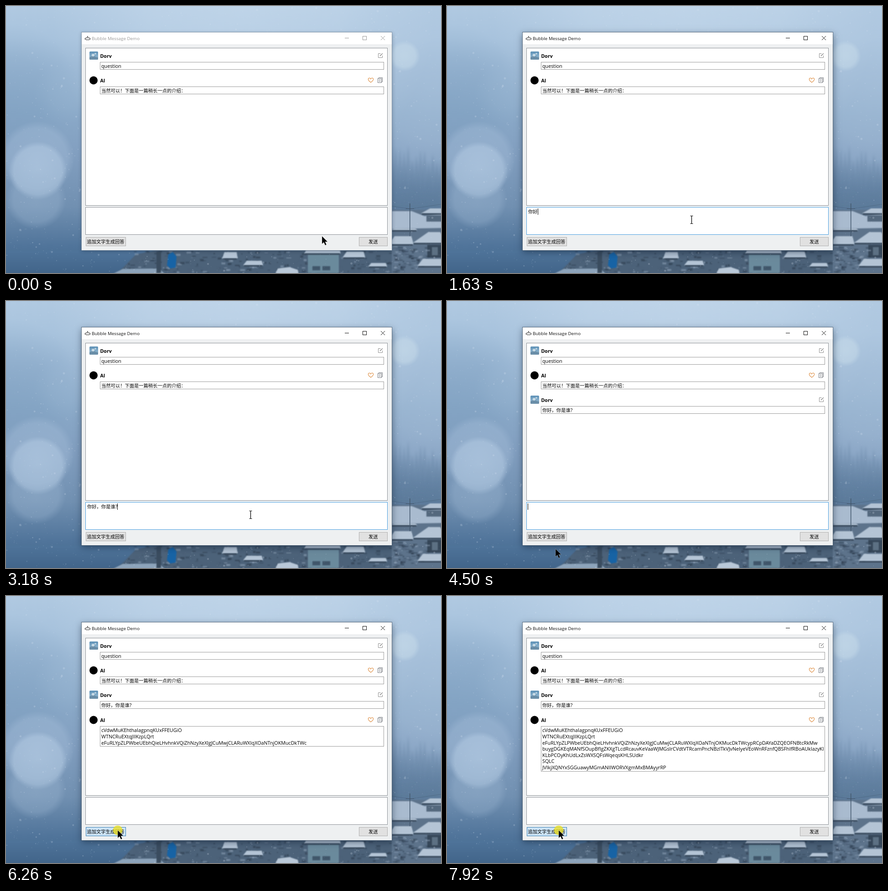
These frames come from a looping animation (954 px wide and 587 px high, 8 s). An HTML page with a canvas:

```html
<!DOCTYPE html>
<html lang="zh-CN">
<head>
<meta charset="utf-8">
<title>Bubble Message Demo</title>
<style>
html, body { margin: 0; width: 100%; height: 100%; overflow: hidden; background: #8aa6c2; }
canvas { display: block; width: 100vw; height: 100vh; }
</style>
</head>
<body>
<canvas id="stage" width="954" height="587"></canvas>
<script>
const W = 954, H = 587, LOOP = 8000;
const stage = document.getElementById('stage').getContext('2d');
let g = stage;

const LATIN = '"Open Sans", sans-serif';
const HAN = '"Noto Sans CJK SC", "Noto Sans CJK", sans-serif';
const USER = 'Dorv';

const ANSWER = [
  'cVdwMuKEhthaIagpnqKUxFFEUGiO',
  'WTNCRuEXtqJIIKzpLQrt',
  'eFuRLYpZLPWbeUEbhQieLHvhnkVQiZhNzyXeXIgJCuMwjCLARuWXIqXOaNTnjOKMucDkTWcypRCpDAYaDZQEOFNBtcRkMw',
  'buygDGKEqMANfSOupBfIgZKXgTLcdRcauvKeVaaWJMGsIrCVdtVTRcamPncNBzITkVJvNeIyeVEoWnRFznfQBSFhIfRBoAUkIazyKl',
  'KLbPCOyKhUdLxZsWXSQFsWqeqsKHLSUdkr',
  'SQLC',
  'JVIkjXQNYxSGGuawyMGmANIIWORVXgmMxBMAyyrRP'
].join('\n');
const MARK_1 = ANSWER.indexOf('WTN') + 3;
const MARK_2 = ANSWER.indexOf('FznfQ');

// ---------- drawing helpers ----------
function rect(x, y, w, h, fill) {
  g.fillStyle = fill;
  g.fillRect(x, y, w, h);
}

function frame(x, y, w, h, line, fill) {
  if (fill) rect(x, y, w, h, fill);
  g.strokeStyle = line;
  g.lineWidth = 1;
  g.strokeRect(x, y, w, h);
}

function poly(pts, fill, line, width = 1, open) {
  g.beginPath();
  for (let i = 0; i < pts.length; i += 2) g.lineTo(pts[i], pts[i + 1]);
  if (!open) g.closePath();
  if (fill) { g.fillStyle = fill; g.fill(); }
  if (line) { g.strokeStyle = line; g.lineWidth = width; g.stroke(); }
}

function disc(x, y, r, fill) {
  g.fillStyle = fill;
  g.beginPath();
  g.arc(x, y, r, 0, 7);
  g.fill();
}

// Soft light; edge sets how far the flat middle reaches.
function glow(x, y, r, color, alpha, edge = 0.5) {
  const grad = g.createRadialGradient(x, y, 0, x, y, r);
  grad.addColorStop(0, `rgba(${color},${alpha})`);
  grad.addColorStop(edge, `rgba(${color},${alpha * 0.8})`);
  grad.addColorStop(1, `rgba(${color},0)`);
  rect(x - r, y - r, 2 * r, 2 * r, grad);
}

function vertical(y0, y1, stops) {
  const grad = g.createLinearGradient(0, y0, 0, y1);
  stops.forEach(([p, c]) => grad.addColorStop(p, c));
  return grad;
}

// Draws mixed Latin and Chinese text, returns the end position.
function text(s, x, y, { size = 10.75, han = size * 0.958, color = '#000', weight = '' } = {}) {
  g.fillStyle = color;
  for (const run of s.match(/[\x00-\xff]+|[^\x00-\xff]+/g) || []) {
    g.font = run.charCodeAt(0) > 255 ? `${weight} ${han}px ${HAN}` : `${weight} ${size}px ${LATIN}`;
    g.fillText(run, x, y);
    x += g.measureText(run).width;
  }
  return x;
}

function seeded(seed) {
  return () => (seed = (seed * 16807) % 2147483647) / 2147483647;
}

// ---------- wallpaper ----------
function roof(x, y, w, h, slant) {
  poly([x + slant, y, x + w - slant * 0.4, y, x + w, y + h, x, y + h], '#b4c4d5');
  rect(x + 2, y + h, w - 4, 3, '#3a4b5d');
}

// Small patches of snow, branches and walls.
function clutter(rnd, count, x, y, w, h) {
  for (let i = 0; i < count; i++) {
    const tone = ['42,57,74', '78,98,120', '140,160,182', '52,70,90'][i % 4];
    rect(x + rnd() * w, y + rnd() * h, 2 + rnd() * 9, 1 + rnd() * 4, `rgba(${tone},.55)`);
  }
}

function wallpaper() {
  const rnd = seeded(77);
  rect(0, 0, W, H, vertical(0, H, [
    [0, '#b0c9e1'], [0.12, '#a8c3dd'], [0.25, '#98b5d2'], [0.4, '#8aa9c8'], [0.55, '#829fc0'],
    [0.75, '#7190b1'], [0.9, '#50749a'], [1, '#45678a']
  ]));
  glow(520, 10, 420, '208,225,241', 0.45);
  glow(940, 180, 230, '185,206,228', 0.4);
  glow(10, 190, 150, '100,138,174', 0.2);
  glow(68, 335, 82, '172,196,222', 0.4, 0.8);
  glow(70, 362, 64, '190,212,234', 0.5, 0.82);
  glow(66, 425, 66, '160,186,213', 0.4, 0.75);
  glow(874, 110, 34, '205,224,236', 0.55, 0.7);
  glow(130, 190, 70, '165,192,217', 0.2);

  // misty trees
  g.filter = 'blur(2px)';
  rect(840, 340, 124, 110, vertical(340, 445, [[0, 'rgba(84,116,148,0)'], [1, 'rgba(82,112,142,.55)']]));
  for (let i = 0; i < 13; i++) {
    const x = 846 + i * 9, top = 306 + rnd() * 36;
    poly([x, top, x + 13, 445, x - 13, 445], vertical(top, 445, [[0, 'rgba(84,115,148,.3)'], [1, 'rgba(84,115,148,.08)']]));
  }

  // lake shore and village
  g.filter = 'blur(1px)';
  rect(0, 537, 340, 50, vertical(537, 587, [[0, '#4f749a'], [1, '#42658a']]));
  poly([245, 587, 285, 546, 330, 537, 954, 537, 954, 587], '#4c6279');
  clutter(rnd, 260, 265, 538, 580, 48);
  poly([232, 590, 256, 578, 335, 577, 350, 590], '#8da4bb');
  rect(330, 540, 10, 47, '#3a4c5f');
  poly([356, 546, 366, 541, 374, 551, 372, 575, 360, 577, 353, 570], '#1763a5');
  roof(474, 541, 34, 14, 5);
  roof(520, 560, 44, 10, 8);
  poly([590, 590, 596, 577, 622, 574, 640, 580, 642, 590], '#b9c8d8');
  rect(662, 545, 68, 42, '#6a8a9c');
  roof(654, 537, 80, 7, 4);
  rect(672, 572, 17, 9, '#40566a');
  rect(694, 572, 17, 9, '#40566a');
  roof(738, 540, 50, 13, 9);
  roof(794, 565, 42, 8, 7);

  rect(846, 448, 110, 140, '#5d738b');
  poly([846, 451, 890, 451, 918, 462, 956, 456, 956, 488, 846, 490], '#a9bbcf');
  roof(910, 445, 56, 11, 20);
  rect(922, 460, 34, 14, '#54687d');
  roof(842, 489, 60, 4, 10);
  roof(840, 506, 54, 18, 12);
  roof(892, 497, 74, 24, 34);
  rect(924, 525, 32, 28, '#364759');
  rect(934, 530, 13, 18, '#5c7083');
  clutter(rnd, 90, 848, 528, 74, 56);
  roof(902, 556, 60, 16, 12);
  g.filter = 'none';
  rect(885, 434, 1.5, 72, '#44586d');
  rect(877, 445, 18, 1, '#44586d');
  poly([846, 440, 886, 446, 954, 436], null, 'rgba(50,68,88,.4)', 0.7, true);

  // snowfall
  for (let i = 0; i < 1800; i++) {
    const big = rnd() > 0.95;
    disc(rnd() * W, rnd() * H, big ? 1.5 + rnd() : 0.4 + rnd() * 0.8,
      `rgba(222,234,246,${big ? 0.22 : 0.08 + rnd() * 0.22})`);
  }
}

const back = document.createElement('canvas');
back.width = W;
back.height = H;
g = back.getContext('2d');
wallpaper();
g = stage;

// ---------- window parts ----------
function shell(active) {
  const ink = active ? '#111' : '#999';
  g.save();
  g.shadowColor = `rgba(10,25,45,${active ? 0.5 : 0.3})`;
  g.shadowBlur = active ? 14 : 8;
  g.shadowOffsetY = active ? 4 : 2;
  rect(165.5, 58, 681, 479, '#eef0f1');
  g.restore();
  frame(165.5, 57.5, 681, 480, active ? 'rgba(60,80,100,.75)' : 'rgba(95,115,135,.6)');
  rect(166, 58, 680, 26, '#fff');

  g.strokeStyle = '#444';
  g.lineWidth = 1;
  g.beginPath();
  g.roundRect(174.5, 69.5, 9, 5, 1.5);
  g.moveTo(179, 69.5);
  g.lineTo(179, 67);
  g.moveTo(173, 71);
  g.lineTo(173, 73.5);
  g.moveTo(185, 71);
  g.lineTo(185, 73.5);
  g.stroke();
  disc(179, 67, 1, '#444');
  disc(177.2, 72, 0.7, '#444');
  disc(180.8, 72, 0.7, '#444');

  text('Bubble Message Demo', 188, 75, { size: 9.8, color: ink });
  rect(743, 70, 9, 1, ink);
  frame(782.5, 66.5, 8, 8, ink);
  poly([822, 66, 831, 75], null, ink, 1, true);
  poly([831, 66, 822, 75], null, ink, 1, true);
  frame(174.5, 92.5, 662, 346, '#8d9298', '#fff');
}

function avatar(x, y) {
  g.save();
  g.beginPath();
  g.roundRect(x, y, 19, 18, 2);
  g.clip();
  rect(x, y, 19, 18, vertical(y, y + 18, [[0, '#5b8fb5'], [0.6, '#88b0cc'], [1, '#4d7088']]));
  poly([x, y + 13, x + 8, y + 9, x + 19, y + 14, x + 19, y + 18, x, y + 18], '#6a8ea8');
  disc(x + 8, y + 8, 3, '#c9dbe6');
  disc(x + 13, y + 5, 2, '#b8d0e0');
  g.restore();
}

function editIcon(x, y) {
  poly([x + 5.5, y + 0.5, x + 0.5, y + 0.5, x + 0.5, y + 9.5, x + 9.5, y + 9.5, x + 9.5, y + 5], null, '#909090', 1, true);
  poly([x + 4, y + 6, x + 9.8, y + 0.3], null, '#808080', 1.2, true);
}

function heartIcon(x, y) {
  g.strokeStyle = '#dc8b3e';
  g.lineWidth = 1.1;
  g.beginPath();
  g.moveTo(x, y + 5);
  g.bezierCurveTo(x - 4, y + 2, x - 6, y, x - 5.6, y - 2.2);
  g.bezierCurveTo(x - 5, y - 5.6, x - 1, y - 5.6, x, y - 2.6);
  g.bezierCurveTo(x + 1, y - 5.6, x + 5, y - 5.6, x + 5.6, y - 2.2);
  g.bezierCurveTo(x + 6, y, x + 4, y + 2, x, y + 5);
  g.stroke();
}

function copyIcon(x, y) {
  poly([x + 2.5, y + 2, x + 2.5, y + 0.5, x + 10.5, y + 0.5, x + 10.5, y + 9.5, x + 8.5, y + 9.5], null, '#7b7f85', 1, true);
  frame(x + 0.5, y + 2.5, 8, 9, '#7b7f85', '#fff');
  rect(x + 2.5, y + 5, 4, 1, '#7b7f85');
  rect(x + 2.5, y + 8, 4, 1, '#7b7f85');
}

function message(dy, fromUser, lines) {
  if (fromUser) {
    avatar(183, 100 + dy);
    editIcon(816, 104 + dy);
  } else {
    disc(192, 109.5 + dy, 9, '#000');
    heartIcon(800, 109 + dy);
    copyIcon(815, 103 + dy);
  }
  text(fromUser ? USER : 'AI', 206.5, 113.5 + dy, { size: 10.6, weight: 'bold' });
  frame(206.5, 123.5 + dy, 622, Math.round(3.4 + 13.7 * lines.length - 0.7), '#9c9c9c', '#fff');
  lines.forEach((s, i) => text(s, 209, 136.3 + dy + i * 13.6));
}

function button(x, w, label, tx, state) {
  const [line, fill] = {
    idle: ['#b0b0b0', '#e1e1e1'], hover: ['#2f8ad4', '#e5f1fb'], down: ['#3a80b4', '#cce4f7']
  }[state];
  frame(x + 0.5, 508.5, w, 19, line, fill);
  text(label, tx, 522.2, { han: 10.25 });
}

// ---------- input method ----------
const CANDIDATES = {
  n: '你 年 呢 那 能 您 女',
  ni: '你 呢 泥 尼 拟 逆 妮',
  "ni'h": '你好 你会 你和 你还 你很 拟好 你回 你后',
  "ni'ha": '你好 你还 你哈 拟好 你含 你喊 你汉 逆行',
  "ni'hao": '你好 拟好 你号 你耗 你豪 尼好 逆号 泥好',
  "ni's": '你是 你说 你谁 你上 你试 你收 逆时',
  "ni'sh": '你是 你说 你谁 你上 你试 你收 逆时',
  "ni'shi": '你是 你试 你使 逆时 你事 拟实 你时',
  "ni'shi's": '你是谁 你师叔 你是说 你试试 你是啥 你是傻 你是双',
  "ni'shi'sh": '你是谁 你师叔 你是说 你试试 你是啥'
};

function popup(caret, words, mx) {
  const x = Math.round(caret) - 3, y = 461, h = 34;
  const itemW = 32.7 + 13.9 * words[0].length;
  const full = itemW * words.length;
  const body = Math.min(full, 507);
  rect(x, y, body + 36, h, '#fff');
  g.save();
  g.beginPath();
  g.rect(x, y, body, h);
  g.clip();
  words.forEach((word, i) => {
    const ix = x + i * itemW, hot = i === 0;
    if (hot) rect(ix, y, itemW, h, '#0078d7');
    else if (mx >= ix && mx < ix + itemW) rect(ix, y, itemW, h, '#a6d8ff');
    text(String(i + 1), ix + 13, y + 22.5, { size: 10, color: hot ? '#d5e9fa' : '#777' });
    text(word, ix + 21.2, y + 23.4, { han: 13.9, color: hot ? '#fff' : '#000' });
  });
  g.restore();
  if (full > body) {
    rect(x + body - 17, y + 2, 17, 29, '#e6e6e6');
    poly([x + body - 13, y + 9, x + body - 4, y + 17, x + body - 13, y + 25], null, '#333', 1.1, true);
  }
  rect(x + body, y, 1, h, '#79b4e4');
  const sx = x + body + 18, sy = y + 17;
  g.strokeStyle = '#222';
  g.lineWidth = 1.1;
  g.beginPath();
  g.arc(sx, sy, 6.3, 0, 7);
  g.moveTo(sx + 3.2, sy + 1.2);
  g.arc(sx, sy + 1.2, 3.2, 0, Math.PI);
  g.stroke();
  disc(sx - 2.3, sy - 2, 0.9, '#222');
  disc(sx + 2.3, sy - 2, 0.9, '#222');
  frame(x + 0.5, y - 0.5, body + 36, h + 1, '#3a93dc');
}

// ---------- pointer ----------
function arrow(x, y) {
  const shape = [0, 0, 0, 17, 4, 13.4, 7, 20, 9.8, 18.8, 6.9, 12.4, 12.2, 12.2];
  poly(shape.map((v, i) => v + (i % 2 ? y : x)), '#000', 'rgba(255,255,255,.5)', 0.6);
}

function beam(x, y) {
  poly([x - 3, y - 8.5, x + 3, y - 8.5], null, '#000', 1, true);
  poly([x, y - 8, x, y + 8], null, '#000', 1.3, true);
  poly([x - 3, y + 8.5, x + 3, y + 8.5], null, '#000', 1, true);
}

const PATH = [[0, 693, 506], [1, 668, 500], [2, 602, 485], [3, 536, 470], [38, 536, 470], [39, 490, 500],
  [40, 345, 566], [41, 238, 545], [42, 234, 540], [43, 238, 530], [44, 243, 520], [45, 245, 515]];

function pointer(k) {
  return PATH.filter(p => p[0] <= k).pop().slice(1);
}

const TYPED = [
  [0, '', ''], [10, '', 'n'], [11, '', 'ni'], [12, '', "ni'h"], [13, '', "ni'ha"], [14, '', "ni'hao"],
  [15, '你好', ''], [16, '你好，', ''], [18, '你好，', 'n'], [19, '你好，', 'ni'], [20, '你好，', "ni's"],
  [21, '你好，', "ni'sh"], [22, '你好，', "ni'shi"], [23, '你好，', "ni'shi's"], [24, '你好，', "ni'shi'sh"],
  [25, '你好，', "ni'shi'shei"], [26, '你好，你是谁', ''], [28, '你好，你是谁?', ''], [32, '', '']
];

function caretOn(k) {
  if (k < 4 || k >= 47) return false;
  return !(k === 8 || k === 9 || k === 28 || (k >= 37 && k < 41));
}

function answerLength(k) {
  if (k < 51) return (k - 49) * 16;
  if (k < 64) return Math.round(MARK_1 + (MARK_2 - MARK_1) * (k - 51) / 13);
  return Math.round(MARK_2 + (ANSWER.length - MARK_2) * Math.min(1, (k - 64) / 8));
}

function draw(t) {
  const k = Math.floor((t + 30) / 110);
  const [mx, my] = pointer(k);
  const focused = k >= 4 && k < 49;

  g.drawImage(back, 0, 0);
  shell(k >= 4);
  message(0, true, ['question']);
  message(54, false, ['当然可以！下面是一篇稍长一点的介绍：']);
  if (k >= 32) message(108, true, [k > 32 ? '你好，你是谁?' : '']);
  if (k >= 50) message(163, false, ANSWER.slice(0, answerLength(k)).split('\n'));

  frame(174.5, 442.5, 662, 60, focused ? '#4a9fe0' : '#8d9298', '#fff');
  button(175, 87, '追加文字生成回答', 177.5, k >= 49 ? 'down' : k >= 44 ? 'hover' : 'idle');
  button(774, 62, '发送', 795, 'idle');

  const [, done, draft] = TYPED.filter(e => e[0] <= k).pop();
  const start = text(done, 178, 456.3);
  const end = text(draft, start, 456.3);
  if (draft) {
    g.setLineDash([1, 1]);
    poly([start, 458.5, end, 458.5], null, '#222', 1, true);
    g.setLineDash([]);
  }
  if (caretOn(k)) rect(Math.round(end) - (done || draft ? 0 : 1), 445, 1, 14, '#000');

  const words = CANDIDATES[draft];
  if (words) popup(end, words.split(' '), mx);

  if (k === 4 || k >= 49) disc(mx, my, 10.5, 'rgba(236,224,36,.78)');
  if (k >= 3 && k < 40 && !words) beam(mx + 0.5, my);
  else arrow(mx, my);
}

function tick() {
  draw(performance.now() % LOOP);
  requestAnimationFrame(tick);
}
tick();
</script>
</body>
</html>
```
